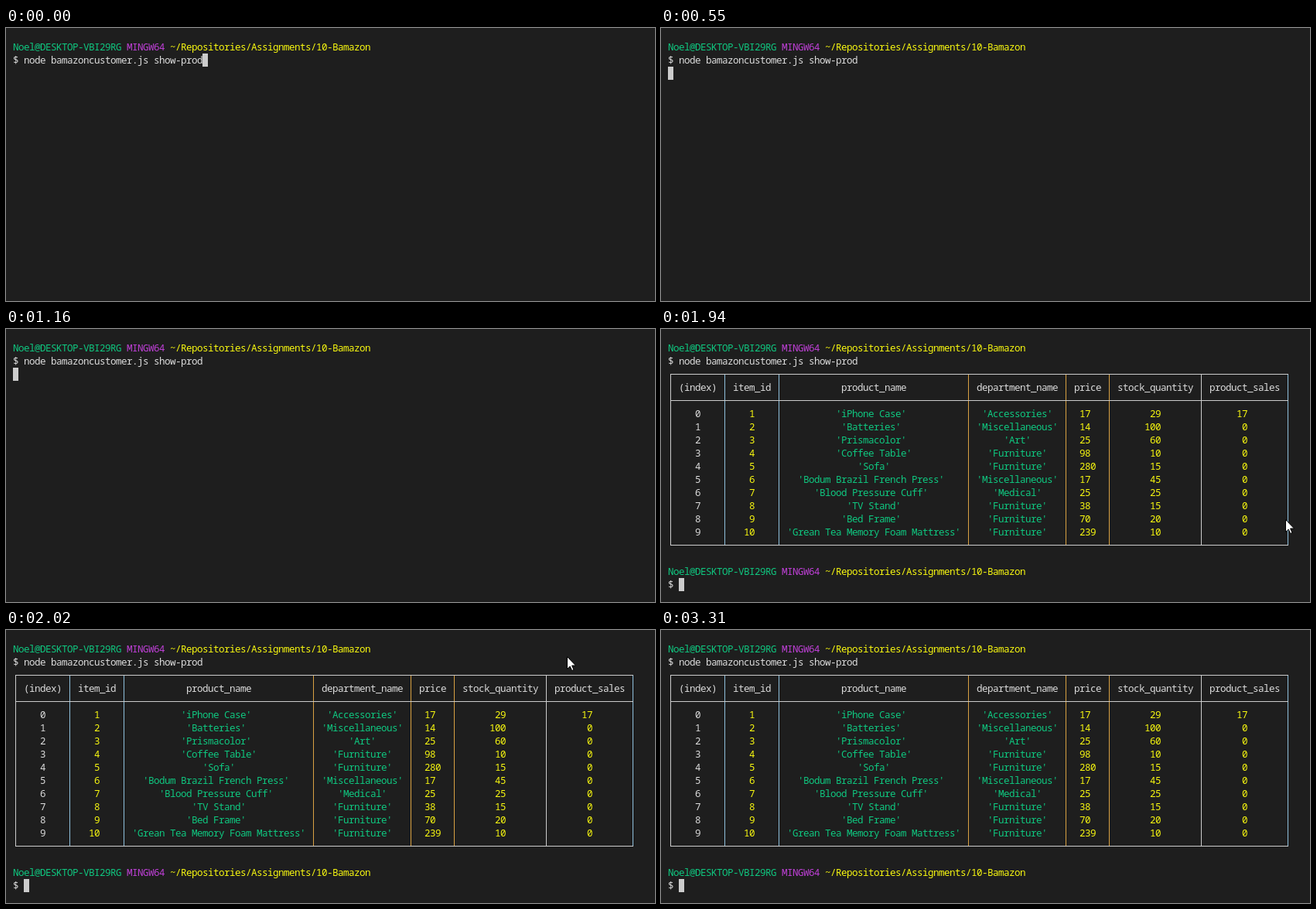
Animation of 839 by 353 pixels, one loop 4.12 s. Source, as an HTML page with a canvas:

```html
<!DOCTYPE html>
<html lang="en">
<head>
<meta charset="utf-8">
<title>Terminal session</title>
<style>
html, body { margin: 0; width: 100%; height: 100%; overflow: hidden; background: #1e1e1e; }
canvas { display: block; }
</style>
</head>
<body>
<canvas id="stage" width="839" height="353"></canvas>
<script>
const ctx = document.getElementById('stage').getContext('2d');

const LOOP = 4120;
const ENTER = 550, OUTPUT = 1570, DONE = 1940, MOVE = 2020, GONE = 2100;

const LEFT = 9, TOP = 16, CELL_W = 7, CELL_H = 17, BASELINE = 13;
const FONT = '500 12.6px "Noto Sans Mono", monospace';
const BG = '#1e1e1e', FG = '#dcdcdc', GREEN = '#0fc880', PURPLE = '#c040d8', YELLOW = '#f8f810';
const RULE = '#cccccc', BLUE_EDGE = '#8fc0dc', ORANGE_EDGE = '#d9a143';

const HEADERS = ['(index)', 'item_id', 'product_name', 'department_name', 'price', 'stock_quantity', 'product_sales'];
const WIDTHS = [9, 9, 34, 17, 7, 16, 15];
const EDGES = [RULE, BLUE_EDGE, BLUE_EDGE, ORANGE_EDGE, ORANGE_EDGE, ORANGE_EDGE, RULE, BLUE_EDGE];
const PRODUCTS = [
  ['iPhone Case', 'Accessories', 17, 29, 17],
  ['Batteries', 'Miscellaneous', 14, 100, 0],
  ['Prismacolor', 'Art', 25, 60, 0],
  ['Coffee Table', 'Furniture', 98, 10, 0],
  ['Sofa', 'Furniture', 280, 15, 0],
  ['Bodum Brazil French Press', 'Miscellaneous', 17, 45, 0],
  ['Blood Pressure Cuff', 'Medical', 25, 25, 0],
  ['TV Stand', 'Furniture', 38, 15, 0],
  ['Bed Frame', 'Furniture', 70, 20, 0],
  ['Grean Tea Memory Foam Mattress', 'Furniture', 239, 10, 0]
];

const cellX = col => LEFT + col * CELL_W;
const cellY = row => TOP + row * CELL_H;

// Each glyph sits in its own terminal cell.
function print(text, col, row, color) {
  ctx.fillStyle = color;
  [...text].forEach((ch, i) => ctx.fillText(ch, cellX(col + i), cellY(row) + BASELINE));
}

function block(col, row) {
  ctx.fillStyle = '#cccccc';
  ctx.fillRect(cellX(col), cellY(row), CELL_W, CELL_H);
}

function prompt(row) {
  print('Noel@DESKTOP-VBI29RG', 0, row, GREEN);
  print('MINGW64', 21, row, PURPLE);
  print('~/Repositories/Assignments/10-Bamazon', 29, row, YELLOW);
  print('$', 0, row + 1, FG);
}

// Cell positions of the vertical rules, from the column widths.
const rules = WIDTHS.reduce((list, w) => [...list, list[list.length - 1] + w + 1], [0]);

function tableRow(cells, row, colorOf) {
  cells.forEach((cell, i) => {
    const text = String(cell);
    const pad = Math.floor((WIDTHS[i] - text.length) / 2);
    print(text, rules[i] + 1 + pad, row, colorOf(cell, i));
  });
}

function table(row) {
  const last = row + 3 + PRODUCTS.length;
  const mid = r => cellY(r) + 8;
  const x0 = cellX(0) + 3, x1 = cellX(rules[rules.length - 1]) + 4;

  rules.forEach((col, i) => {
    ctx.fillStyle = EDGES[i];
    ctx.fillRect(cellX(col) + 3, mid(row), 1, mid(last) - mid(row) + 1);
  });
  ctx.fillStyle = RULE;
  [row, row + 2, last].forEach(r => ctx.fillRect(x0, mid(r), x1 - x0, 1));

  tableRow(HEADERS, row + 1, () => FG);
  PRODUCTS.forEach(([name, dept, ...numbers], i) => {
    const cells = [i, i + 1, `'${name}'`, `'${dept}'`, ...numbers];
    tableRow(cells, row + 3 + i, (cell, c) =>
      c === 0 ? FG : typeof cell === 'string' ? GREEN : YELLOW);
  });
}

const arrow = new Path2D('M.5 .5V16.5L4.2 13L6.7 18.5L9 17.5L6.6 12H11.5Z');

function pointer(x, y) {
  ctx.save();
  ctx.translate(x, y);
  ctx.fillStyle = '#fff';
  ctx.fill(arrow);
  ctx.strokeStyle = '#000';
  ctx.lineWidth = 1;
  ctx.stroke(arrow);
  ctx.restore();
}

function draw(t) {
  ctx.fillStyle = BG;
  ctx.fillRect(0, 0, 839, 353);
  ctx.font = FONT;
  ctx.textBaseline = 'alphabetic';

  prompt(0);
  print('node bamazoncustomer.js show-prod', 2, 1, FG);
  if (t >= OUTPUT) table(2);
  if (t >= DONE) prompt(17);

  if (t < ENTER) block(35, 1);
  else if (t < OUTPUT) block(0, 2);
  else if (t < DONE) block(0, 16);
  else block(2, 18);

  if (t >= DONE && t < MOVE) pointer(807, 246);
  else if (t >= MOVE && t < GONE) pointer(725, 34);
}

const start = performance.now();
function tick() {
  draw((performance.now() - start) % LOOP);
  requestAnimationFrame(tick);
}
tick();
</script>
</body>
</html>
```
